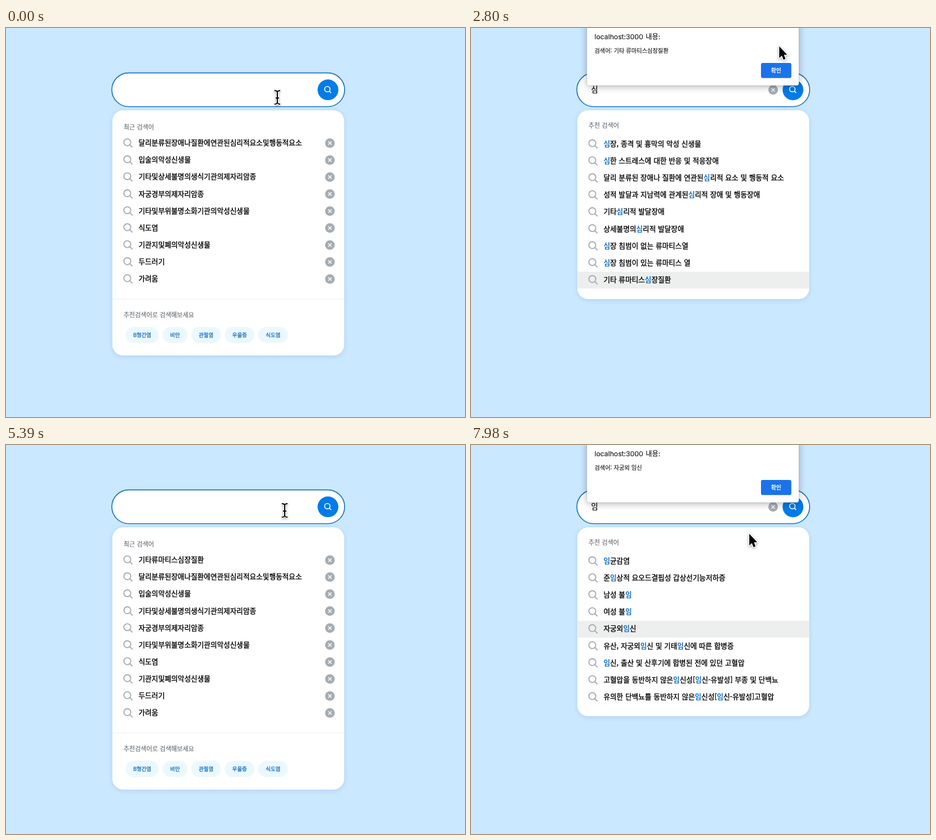
An HTML page with a canvas that plays this animation: 812x690 px, repeating every 8 s.

```html
<!DOCTYPE html>
<html lang="ko">
<head>
<meta charset="utf-8">
<title>검색</title>
<style>
html, body { margin: 0; width: 100%; height: 100%; overflow: hidden; background: #cae8ff; }
canvas { display: block; }
</style>
</head>
<body>
<canvas id="stage" width="812" height="690"></canvas>
<script>
const ctx = document.getElementById('stage').getContext('2d');
const LOOP = 8000, STEP = 70;
const CJK = '"Noto Sans CJK KR", "Noto Sans CJK", sans-serif';
const BLUE = '#1a75c8', GREY = '#a5adb3', LABEL = '#6c7278';
const ROW = 30.13, ROWS_TOP = 191.2;

const recent = [
  '달리분류된장애나질환에연관된심리적요소및행동적요소', '입술의악성신생물',
  '기타및상세불명의생식기관의제자리암종', '자궁경부의제자리암종',
  '기타및부위불명소화기관의악성신생물', '식도염',
  '기관지및폐의악성신생물', '두드러기', '가려움'
];
const recentNext = ['기타류마티스심장질환', ...recent];
const tags = ['B형간염', '비만', '관절염', '우울증', '식도염'];

const heart = [
  '심장, 종격 및 흉막의 악성 신생물', '심한 스트레스에 대한 반응 및 적응장애',
  '달리 분류된 장애나 질환에 연관된심리적 요소 및 행동적 요소',
  '성적 발달과 지남력에 관계된심리적 장애 및 행동장애',
  '기타심리적 발달장애', '상세불명의심리적 발달장애',
  '심장 침범이 없는 류마티스열', '심장 침범이 있는 류마티스 열', '기타 류마티스심장질환'
];
const pregnancy = [
  '임균감염', '준임상적 요오드결핍성 갑상선기능저하증', '남성 불임', '여성 불임',
  '자궁외임신', '유산, 자궁외임신 및 기태임신에 따른 합병증',
  '임신, 출산 및 산후기에 합병된 전에 있던 고혈압',
  '고혈압을 동반하지 않은임신성[임신-유발성] 부종 및 단백뇨',
  '유의한 단백뇨를 동반하지 않은임신성[임신-유발성]고혈압'
];

const searches = [
  { keys: [[280, 'ㅅ'], [420, '시'], [560, '심']], list: heart, ready: 1050,
    open: 2310, close: 3290, end: 3920, row: 8, message: '기타 류마티스심장질환' },
  { keys: [[5460, 'ㅇ'], [5600, '이'], [5670, '임']], list: pregnancy, ready: 6160,
    open: 7490, close: LOOP, end: LOOP, row: 4, message: '자궁외 임신' }
];

// time, x, y, pointer shape
const path = [
  [0, 480, 123, 'beam'], [280, 480, 123, ''],
  [1120, 470, 130, 'beam'], [1190, 440, 165, 'arrow'], [1260, 400, 212, 'hand'],
  [1330, 341, 281, 'hand'], [1540, 300, 350, 'hand'], [1820, 318, 430, 'hand'],
  [2170, 325, 451, 'hand'], [2310, 325, 452, 'arrow'], [2380, 330, 464, 'arrow'],
  [2800, 545, 32, 'arrow'], [2940, 545, 34, 'arrow'], [3150, 540, 74, 'arrow'],
  [3290, 540, 76, 'arrow'], [3710, 540, 115, 'hand'], [3780, 542, 118, 'hand'],
  [3920, 539, 120, 'beam'], [3990, 541, 76, 'beam'], [4060, 539, 122, 'beam'],
  [4200, 539, 122, 'beam'], [4410, 380, 86, 'beam'], [4620, 200, 108, 'beam'],
  [4760, 330, 131, 'beam'], [4970, 493, 116, 'beam'], [5460, 493, 116, ''],
  [6440, 493, 118, 'beam'], [6510, 480, 150, 'arrow'], [6580, 455, 215, 'hand'],
  [6790, 390, 370, 'hand'], [7000, 378, 397, 'hand'], [7070, 380, 392, 'hand'],
  [7140, 375, 368, 'hand'], [7280, 365, 338, 'hand'], [7420, 362, 332, 'hand'],
  [7490, 362, 332, 'arrow'], [7980, 492, 157, 'arrow'], [LOOP, 492, 157, 'arrow']
];

const shapes = {
  beam: new Path2D('M-5-12Q-1-12 0-9.5Q1-12 5-12M0-9.5V9.5M-5 12Q-1 12 0 9.5Q1 12 5 12M-3 1.2H3'),
  arrow: new Path2D('M.3 .6V21.2L4.9 17L7.8 24.2L11.4 22.7L8.5 15.6H14.4Z'),
  hand: new Path2D('M-1.2 .8Q-.8-1.6 1.4-.8L4.5 6.2Q6.4 4.8 7.6 6.4Q9.6 5.2 10.9 7.2' +
    'Q13.2 6.6 14 9Q16 13 14.6 17L13.6 21H4.6Q2 17.6-1.6 15.4L-5.4 11.8Q-5.8 9.4-3.2 10L1.8 12Z'),
  creases: new Path2D('M6.2 13.5L7.2 18M8.8 13.2L9.4 18M11.4 12.8L11.6 18')
};

function pointerAt(t) {
  const i = Math.max(0, path.findIndex(p => p[0] > t) - 1);
  const [t0, x0, y0, kind] = path[i], [t1, x1, y1] = path[i + 1];
  const k = (t - t0) / (t1 - t0);
  return { x: x0 + (x1 - x0) * k, y: y0 + (y1 - y0) * k, kind };
}

function text(str, x, cy, size, color, weight = 400, family = CJK) {
  const y = cy + size * 0.38;
  ctx.font = `${weight} ${size}px ${family}`;
  ctx.wordSpacing = size * 0.075 + 'px';
  ctx.fillStyle = ctx.strokeStyle = color;
  ctx.fillText(str, x, y);
  if (weight < 700) { // a hairline gives the heavier screen rendering
    ctx.lineWidth = weight === 500 ? 0.35 : 0.2;
    ctx.strokeText(str, x, y);
  }
  return ctx.measureText(str).width;
}

function box(x, y, w, h, r, fill) {
  ctx.beginPath();
  ctx.roundRect(x, y, w, h, r);
  ctx.fillStyle = fill;
  ctx.fill();
}

function shadowed(color, blur, dy, draw) {
  ctx.save();
  ctx.shadowColor = color;
  ctx.shadowBlur = blur;
  ctx.shadowOffsetY = dy;
  draw();
  ctx.restore();
}

function line(color, width, ...pts) {
  ctx.beginPath();
  for (let i = 0; i < pts.length; i += 4) {
    ctx.moveTo(pts[i], pts[i + 1]);
    ctx.lineTo(pts[i + 2], pts[i + 3]);
  }
  ctx.strokeStyle = color;
  ctx.lineWidth = width;
  ctx.stroke();
}

function disc(x, y, r, color) {
  ctx.beginPath();
  ctx.arc(x, y, r, 0, 7);
  ctx.fillStyle = color;
  ctx.fill();
}

function lens(x, y, r, reach, color, width) {
  ctx.beginPath();
  ctx.arc(x, y, r, 0, 7);
  ctx.strokeStyle = color;
  ctx.lineWidth = width;
  ctx.stroke();
  const d = r * Math.SQRT1_2;
  line(color, width, x + d, y + d, x + reach, y + reach);
}

function cross(x, y) {
  disc(x, y, 8.5, GREY);
  line('#fff', 1.4, x - 3, y - 3, x + 3, y + 3, x + 3, y - 3, x - 3, y + 3);
}

function panel(bottom) {
  shadowed('rgba(20,70,120,.13)', 8, 2, () => box(188.2, 146, 410, bottom - 146, 19, '#fff'));
}

function drawInput(query, s, t) {
  box(187.2, 79.7, 411.9, 59.8, 29.9, '#fff');
  ctx.strokeStyle = BLUE;
  ctx.lineWidth = 1.7;
  ctx.stroke();
  disc(569.6, 109.7, 18.4, '#007be8');
  lens(568.5, 108.5, 4.8, 6.8, '#fff', 1.6);
  if (!query) return;
  cross(534.5, 109.7);
  text(query, 212.6, 108.8, 13.3, '#000');
  if (t >= s.open) return;
  line('#111', 1, 213, 116.5, 225, 116.5);
  const last = s.keys[2][0];
  if (t < last || (t - last) % 1000 < 490) line('#111', 1, 225.5, 102, 225.5, 118);
}

function drawRecent(items) {
  const dy = (items.length - 9) * ROW;
  panel(581 + dy);
  text('최근 검색어', 208, 176, 11, LABEL);
  items.forEach((item, i) => {
    const y = 204.2 + i * ROW;
    lens(214.6, y - 1.5, 6.1, 9.2, GREY, 1.9);
    text(item, 234.5, y - 0.8, 12.57, '#000', 500);
    cross(573, y);
  });
  line('#e9edf0', 1, 188, 481 + dy, 598.5, 481 + dy);
  text('추천검색어로 검색해보세요', 208, 508.5 + dy, 11, LABEL);
  let x = 211.6;
  for (const tag of tags) {
    ctx.font = `500 9.4px ${CJK}`;
    const w = ctx.measureText(tag).width + 26.6;
    box(x, 530 + dy, w, 29, 14.5, '#ecf8ff');
    text(tag, x + 13.3, 544.2 + dy, 9.4, BLUE, 500);
    x += w + 6.8;
  }
}

function drawSuggestions(items, key, hover) {
  panel(items.length ? 481 : 211);
  text('추천 검색어', 208, 173, 11, LABEL);
  items.forEach((item, i) => {
    const top = ROWS_TOP + i * ROW, y = top + 14.6;
    if (i === hover) box(188.2, top, 410, ROW, 0, '#edefee');
    lens(214.6, y - 1.5, 6.1, 9.2, GREY, 1.9);
    let x = 234.5;
    for (const part of item.split(new RegExp(`(${key})`))) {
      if (!part) continue;
      const hit = part === key;
      x += text(part, x, y - 0.6, 12.57, hit ? BLUE : '#000', hit ? 700 : 500);
    }
  });
}

function drawDialog(message) {
  shadowed('rgba(0,0,0,.3)', 13, 2, () => box(205, -10, 375, 112, 4, '#fff'));
  ctx.strokeStyle = 'rgba(0,0,0,.18)';
  ctx.lineWidth = 0.6;
  ctx.stroke();
  text('localhost:3000 내용:', 218.5, 15.4, 12.2, '#202124', 400, 'Inter, ' + CJK);
  text('검색어: ' + message, 218.5, 40.3, 10.2, '#202124');
  box(513, 62, 53.7, 26.7, 3, '#1a73e8');
  text('확인', 530.8, 75, 9.8, '#fff', 700);
}

function drawPointer({ x, y, kind }) {
  if (!kind) return;
  const shape = shapes[kind];
  ctx.save();
  ctx.translate(x, y);
  ctx.lineJoin = 'round';
  shadowed('rgba(0,0,0,.35)', 4, 1.5, () => {
    ctx.strokeStyle = '#fff';
    ctx.lineWidth = kind === 'beam' ? 4 : 3;
    ctx.stroke(shape);
  });
  if (kind === 'beam') {
    ctx.strokeStyle = '#000';
    ctx.lineWidth = 2;
    ctx.stroke(shape);
  } else {
    ctx.fillStyle = '#000';
    ctx.fill(shape);
  }
  if (kind === 'hand') {
    ctx.strokeStyle = '#fff';
    ctx.lineWidth = 0.9;
    ctx.stroke(shapes.creases);
  }
  ctx.restore();
}

function hoverRow(t) {
  const p = pointerAt(Math.max(0, t - STEP)); // highlight trails the pointer by one step
  return p.kind === 'hand' ? Math.floor((p.y - ROWS_TOP) / ROW) : -1;
}

function draw(t) {
  ctx.fillStyle = '#cae8ff';
  ctx.fillRect(0, 0, 812, 690);
  const s = searches.find(q => t >= q.keys[0][0] && t < q.end);
  const query = s ? s.keys.filter(k => k[0] <= t).pop()[1] : '';
  const modal = s && t >= s.open && t < s.close;
  drawInput(query, s, t);
  if (s) drawSuggestions(t < s.ready ? [] : s.list, query, modal ? s.row : hoverRow(t));
  else drawRecent(t < 280 ? recent : recentNext);
  if (modal) drawDialog(s.message);
  drawPointer(pointerAt(t));
}

const start = performance.now();
function frame() {
  const t = (performance.now() - start) % LOOP;
  draw(Math.floor(t / STEP) * STEP);
  requestAnimationFrame(frame);
}
frame();
</script>
</body>
</html>
```
